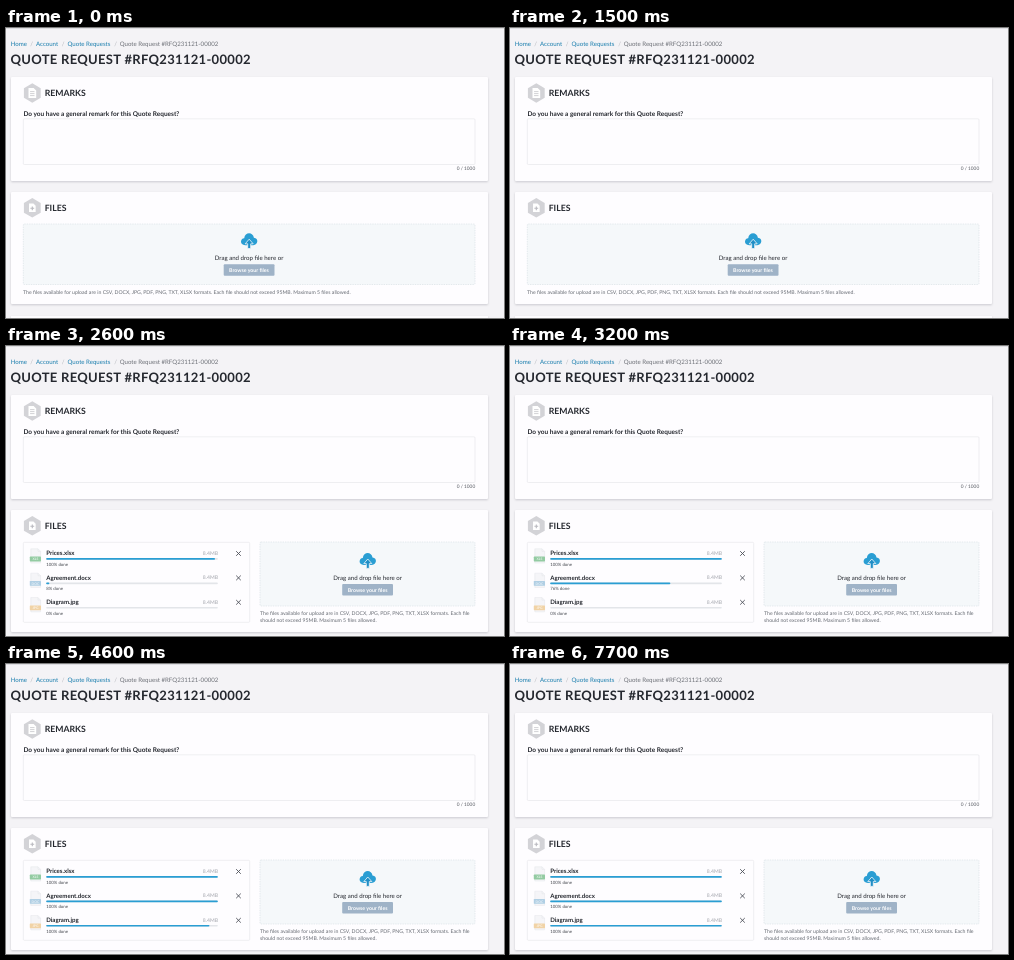
Animation, 498 px wide and 290 px high, one loop 8000 ms. Source, as an HTML page:

```html
<!DOCTYPE html>
<html lang="en">
<head>
<meta charset="utf-8">
<title>Quote request</title>
<style>
html, body { margin: 0; width: 100%; height: 100%; overflow: hidden; background: #f4f3f6; }
svg { display: block; width: 498px; height: 290px; }
text { font: 6.1px Lato, sans-serif; fill: #25282f; text-rendering: geometricPrecision; white-space: pre; }
.bold { font-weight: 700; }
.title { font-size: 13.02px; letter-spacing: .3px; }
.head { font-size: 8.7px; }
.label { font-size: 6.5px; }
.small { font-size: 5.18px; fill: #666a72; }
.count { font-size: 4.8px; fill: #55585f; }
.done { font-size: 4.36px; fill: #44474e; }
.size { font-size: 5.1px; fill: #a3a5ac; text-anchor: end; }
.link { fill: #1a7eae; }
.crumb { fill: #6d7077; }
.slash { fill: #b4b6bc; }
.mid { text-anchor: middle; }
.end { text-anchor: end; }
.button { font-size: 5.23px; fill: #fff; }
.tag { font-size: 3.4px; fill: #fff; fill-opacity: .75; text-anchor: middle; }
.card { fill: #fefdff; filter: drop-shadow(0 1px 1.3px rgba(40, 40, 60, .2)); }
.box { fill: #fefdff; stroke: #e4e4e8; stroke-width: .6; }
.drop { fill: #f5f8fa; stroke: #d5dde3; stroke-width: .6; stroke-dasharray: 1.4 1; }
</style>
</head>
<body>
<svg viewBox="0 0 498 290">
  <defs>
    <path id="hex" d="M0-9.7L8.4-4.85V4.85L0 9.7L-8.4 4.85V-4.85Z" fill="#d3d3d7"/>
    <path id="page" d="M-3.8-5H1.3L3.9-2.4V5H-3.8Z" fill="#fff"/>
    <g id="cloud" fill="#2a9ed3">
      <path d="M-4 3.4C-9.8 3.2-9-3.4-5-3.5C-4.4-10 3.8-10.2 4.7-4C9.8-3.6 9 3.2 4 3.4Z"/>
      <path d="M0-2.6L4 2H1.5V6.8H-1.5V2H-4Z" fill="#1f8ec6" stroke="#f5f8fa" stroke-width=".8"/>
    </g>
  </defs>
  <rect width="498" height="290" fill="#f4f3f6"/>
  <rect width="498" height="1" fill="#dddde1"/>

  <text class="link" x="4.8" y="17.6">Home</text>
  <text class="slash" x="24.3" y="17.6">/</text>
  <text class="link" x="30" y="17.6">Account</text>
  <text class="slash" x="55.8" y="17.6">/</text>
  <text class="link" x="61.5" y="17.6">Quote Requests</text>
  <text class="slash" x="108.2" y="17.6">/</text>
  <text class="crumb" x="113.7" y="17.6">Quote Request #RFQ231121-00002</text>
  <text class="bold title" x="4.4" y="36">QUOTE REQUEST #RFQ231121-00002</text>

  <rect class="card" x="5" y="49" width="477" height="104" rx="1"/>
  <g transform="translate(26.3 65)">
    <use href="#hex"/><use href="#page"/>
    <path d="M-2.2-1.4H2.2M-2.2.6H2.2M-2.2 2.6H2.2" stroke="#c6c6cb" stroke-width=".8"/>
  </g>
  <text class="bold head" x="38.7" y="68.2">REMARKS</text>
  <text class="bold label" x="17.4" y="87.7">Do you have a general remark for this Quote Request?</text>
  <rect class="box" x="17.3" y="90.8" width="451.7" height="45.7" rx="1"/>
  <text class="count end" x="469.2" y="142.4">0 / 1000</text>

  <rect class="card" id="filesCard" x="5" y="164" width="477" height="112" rx="1"/>
  <g transform="translate(26.3 179.8)">
    <use href="#hex"/><use href="#page" transform="scale(.86)"/>
    <path d="M0-1.4V2.4M-1.9.5H1.9" stroke="#b9b9bf" stroke-width="1.1"/>
  </g>
  <text class="bold head" x="38.7" y="183.2">FILES</text>

  <g id="empty">
    <rect class="drop" x="17.3" y="196" width="451.7" height="60.5" rx="1"/>
    <use href="#cloud" x="243.2" y="213.8"/>
    <text class="mid" x="243" y="231.7">Drag and drop file here or</text>
    <rect x="217.7" y="236.3" width="50.8" height="11.4" rx="1" fill="#9fb3c7"/>
    <text class="bold button mid" x="243" y="243.9">Browse your files</text>
    <text class="small" x="17" y="266.2">The files available for upload are in CSV, DOCX, JPG, PDF, PNG, TXT, XLSX formats. Each file should not exceed 95MB. Maximum 5 files allowed.</text>
    <rect class="card" x="5" y="288" width="477" height="6"/>
  </g>

  <g id="filled">
    <rect class="box" x="17.3" y="196.3" width="226.4" height="80" rx="1"/>
    <g id="rows"></g>
    <rect class="drop" x="254" y="196" width="215" height="64" rx="1"/>
    <use href="#cloud" x="361.8" y="215.6"/>
    <text class="mid" x="361.6" y="233.5">Drag and drop file here or</text>
    <rect x="336.2" y="238" width="50.8" height="11.4" rx="1" fill="#9fb3c7"/>
    <text class="bold button mid" x="361.6" y="245.6">Browse your files</text>
    <text class="small" x="254" y="269.4">The files available for upload are in CSV, DOCX, JPG, PDF, PNG, TXT, XLSX formats. Each file</text>
    <text class="small" x="254" y="275.5">should not exceed 95MB. Maximum 5 files allowed.</text>
  </g>

  <path id="hand" transform="translate(299 225)" d="M2.3 6.5V1.2C2.3.2 3.8.2 3.8 1.2V4.1L7.2 4.8C8 5 8.2 5.6 8.1 6.3L7.3 10.6H3.2L.3 7.1C-.1 6.4.8 5.7 1.4 6.1Z" fill="#fff" stroke="#222" stroke-width=".8" stroke-linejoin="round"/>
</svg>
<script>
const LOOP = 8000, DROP = 1600, LEAVE = 2100, LAG = 55, BAR = 171.6;
const files = [
  { name: "Prices.xlsx", tag: "XLS", color: "#93cba2", start: 1690, length: 870 },
  { name: "Agreement.docx", tag: "DOC", color: "#b0cfe4", start: 2530, length: 880 },
  { name: "Diagram.jpg", tag: "JPG", color: "#f1d3a6", start: 3490, length: 1110 }
];
const el = id => document.getElementById(id);

el("rows").innerHTML = files.map((f, i) => `
  <g transform="translate(0 ${i * 24.4})">
    <path d="M24.8 202.8H32L34.6 205.4V217H24.8Z" fill="#f5f5f8" stroke="#e3e4e8" stroke-width=".5"/>
    <path d="M32 202.8V205.4H34.6" fill="none" stroke="#e3e4e8" stroke-width=".5"/>
    <rect x="23.8" y="210.6" width="11.2" height="4.8" rx=".6" fill="${f.color}"/>
    <text class="bold tag" x="29.4" y="214.2">${f.tag}</text>
    <text class="bold" x="40.2" y="209.2">${f.name}</text>
    <text class="size" x="212" y="209.1">8.4MB</text>
    <rect x="40.2" y="212.1" width="${BAR}" height="1.7" rx=".8" fill="#e3e5e9"/>
    <rect class="bar" x="40.2" y="212.1" height="1.7" rx=".8" fill="#2a9ed3"/>
    <text class="done" x="40.2" y="219.9"></text>
    <path d="M230.2 205.2L234.8 209.8M234.8 205.2L230.2 209.8" stroke="#4c5058" stroke-width=".9"/>
  </g>`).join("");

const bars = document.querySelectorAll(".bar");
const labels = document.querySelectorAll(".done");
const progress = (f, t) => Math.min(1, Math.max(0, (t - f.start) / f.length));
const show = (id, on) => el(id).setAttribute("visibility", on ? "visible" : "hidden");

function draw(t) {
  const dropped = t >= DROP;
  show("empty", !dropped);
  show("filled", dropped);
  show("hand", dropped && t < LEAVE);
  el("filesCard").setAttribute("height", dropped ? 122 : 112);
  files.forEach((f, i) => {
    bars[i].setAttribute("width", BAR * progress(f, t - LAG));
    labels[i].textContent = Math.round(progress(f, t) * 100) + "% done";
  });
}

const origin = performance.now();
function tick() {
  draw((performance.now() - origin) % LOOP);
  requestAnimationFrame(tick);
}
tick();
</script>
</body>
</html>
```
